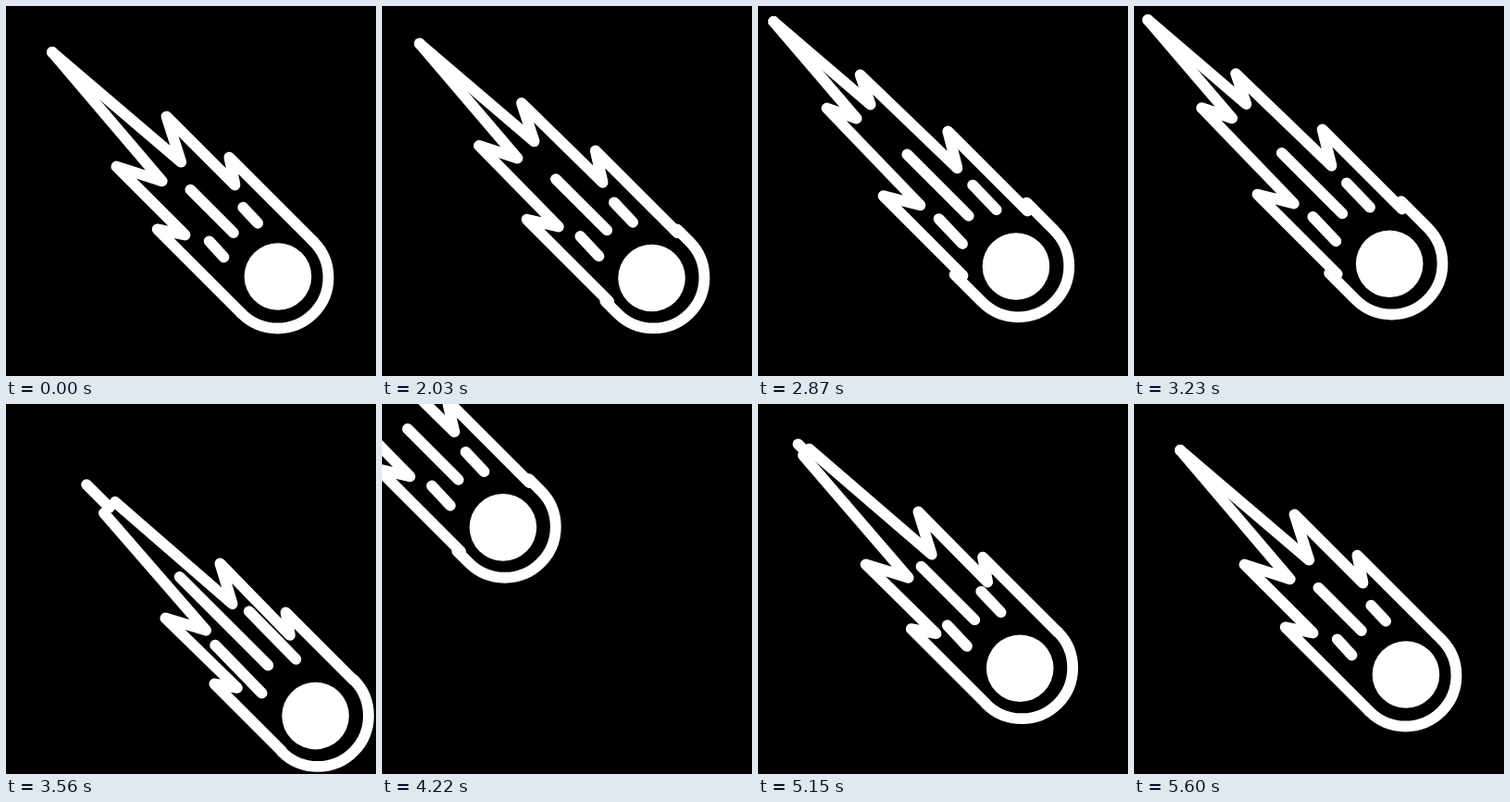
Write an HTML page with a canvas that moves like this. It is 400 px wide and 400 px high and loops after 5.63 s.

```html
<!DOCTYPE html>
<html lang="en">
<head>
<meta charset="utf-8">
<title>Comet</title>
<style>
  html, body { margin: 0; width: 100%; height: 100%; overflow: hidden; background: #000; }
  canvas { display: block; }
</style>
</head>
<body>
<canvas id="stage" width="400" height="400"></canvas>
<script>
const ctx = document.getElementById('stage').getContext('2d');
const LOOP = 5630, HOLD = 2000, STEP = 30, LAST = 120;
const HOME = 293.5, RADIUS = 55, EDGE = RADIUS / Math.SQRT2;

// Tail outline, one side: [along, across] at rest, then the shift when stretched and when flared
const TAIL = [
  [-243.5, 0, -21, 0, 18.5, 6],
  [-114.5, 10.3, -53, -2.8, 8, 4],
  [-147, 27, -42, -9, 12, 2.5],
  [-73, 27, -13, -7, 14.5, 1.5],
  [-91, EDGE, -20, -4, 18, -0.3],
  [0, EDGE, -25, -4, 0, -0.3]
];

// Flicker strength: [step, strength]
const FLICKER = [[0, 0.48], [29, 1.13], [52, 1.03], [74, 0.58], [93, 1.1], [112, 0.25], [120, 0]];

function lerpTable(table, k) {
  let i = 1;
  while (i < table.length - 1 && k > table[i][0]) i++;
  const [k0, v0] = table[i - 1], [k1, v1] = table[i];
  return v0 + (v1 - v0) * (k - k0) / (k1 - k0);
}

function flicker(k) {
  const wave = Math.sin(k * Math.PI * 0.3);
  return Math.sign(wave) * Math.abs(wave) ** 0.6 * lerpTable(FLICKER, k);
}

// Distance flown since the launch
const launch = k => k > 40 && k < 60 ? 385 * ((k - 40) / 18) ** 4.65 : 0;

function headAt(k) {
  if (k < 40) {
    const p = k / 40;
    return HOME - 15 * p * p * (3 - 2 * p);
  }
  if (k < 60) return HOME - 15 + launch(k);
  const left = (LAST - k) / 60;
  return HOME - 265 * left ** 2.5 - 120 * left ** 6;
}

function draw(k) {
  const head = headAt(k), s = flicker(k), fly = launch(k);
  const stretch = Math.max(s, 0), flare = Math.max(-s, 0), swing = Math.abs(s);
  const at = (d, w) => [head + d + w, head + d - w];

  const line = points => {
    ctx.beginPath();
    points.forEach(([d, w]) => ctx.lineTo(...at(d, w)));
    ctx.stroke();
  };

  ctx.fillStyle = '#000';
  ctx.fillRect(0, 0, 400, 400);
  ctx.fillStyle = ctx.strokeStyle = '#fff';
  ctx.lineCap = ctx.lineJoin = 'round';
  ctx.lineWidth = 11.8;

  // Tail
  const side = TAIL.map(([d, w, sd, sw, fd, fw]) =>
    [d + sd * stretch + fd * flare, w + sw * stretch + fw * flare]);
  line(side);
  line(side.map(([d, w]) => [d, -w]));
  const apex = -243.5 - 21 * stretch + 3 * flare - Math.min(10, fly * 0.16);
  line([[apex, 0], [side[0][0], 0]]);

  // Head
  const rim = -30 * stretch;
  ctx.beginPath();
  ctx.moveTo(...at(rim, EDGE));
  ctx.arc(head, head, RADIUS, -Math.PI / 4, Math.PI * 3 / 4);
  ctx.lineTo(...at(rim, -EDGE));
  ctx.stroke();

  // Core
  const shake = 0.75 - 2 * Math.min(1, 3 * swing);
  ctx.beginPath();
  ctx.arc(...at(-0.3 - 0.8 * swing, shake), 36.3, 0, Math.PI * 2);
  ctx.fill();

  // Streaks
  line([[-94.5 - 26 * swing - Math.min(30, fly * 0.5), 0.4], [-48 - 6 * swing, 0.4]]);
  const from = -56.5 - 12 * swing - Math.min(25, fly * 0.43);
  const to = -40 - 2.3 * swing;
  line([[from, 19.3], [to, 18.7]]);
  line([[from, -17.3], [to, -18]]);
}

function tick(now) {
  const t = now % LOOP;
  const k = Math.floor((t - HOLD) / STEP + 1e-6);
  draw(Math.min(LAST, Math.max(0, k)));
  requestAnimationFrame(tick);
}

const start = performance.now();
draw(0);
requestAnimationFrame(function first() { tick(Math.max(0, performance.now() - start)); });
</script>
</body>
</html>
```
